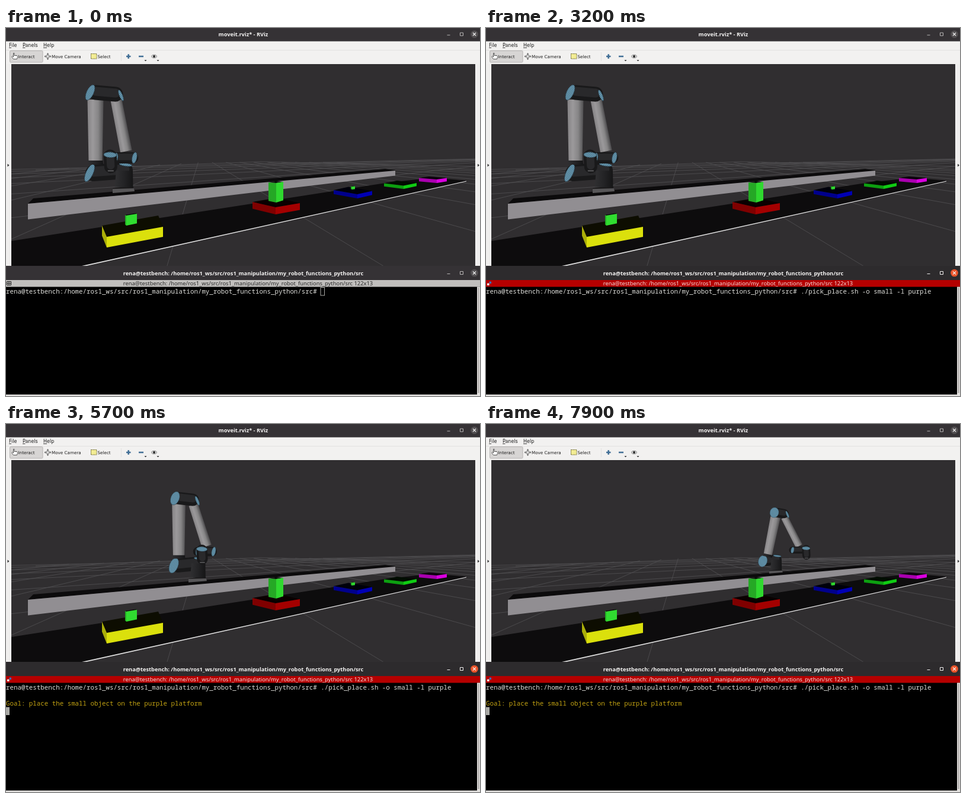
An HTML page with a canvas for the animation above (8 s loop, 800x622 px).

```html
<!DOCTYPE html>
<html lang="en">
<head>
<meta charset="utf-8">
<title>Pick and place</title>
<style>
html, body { margin: 0; width: 100%; height: 100%; overflow: hidden; background: #000; }
canvas, svg { position: absolute; left: 0; top: 0; display: block; }
svg { --bar: #353235; --disc: #535052; --btn: #b9b7b6; --tab: #c1bfbd; --tabText: #2a2a2a; }
.on { --bar: #2d2b2d; --disc: #e9542a; --btn: #f0efee; --tab: #b50000; --tabText: #f6dede; }
.bar { fill: var(--bar); }
.btn { fill: none; stroke: var(--btn); }
.disc { fill: var(--disc); }
.bold { font: bold 9.24px 'Noto Sans', 'Open Sans', sans-serif; fill: #f4f3f2; text-anchor: middle; }
.tab { font: 9.35px 'Noto Sans', 'Open Sans', sans-serif; fill: var(--tabText); text-anchor: middle; }
.menu { font: 8px 'DejaVu Sans', sans-serif; fill: #1c1c1c; }
.tool { font: 7.2px 'DejaVu Sans', sans-serif; fill: #1c1c1c; }
.term { font: 10.8px 'Noto Sans Mono', 'DejaVu Sans Mono', monospace; fill: #dededa; white-space: pre; }
.goal { fill: #c2a212; }
.u { text-decoration: underline; }
.focus, .on .idle { visibility: hidden; }
.on .focus { visibility: visible; }
</style>
</head>
<body>
<canvas id="scene" width="800" height="622"></canvas>
<svg width="800" height="622" viewBox="0 0 800 622">
  <defs>
    <g id="winButtons">
      <path class="btn" d="M744.500 1.500h5M766.500 -2.500h5v5h-5z"/>
      <circle class="disc" cx="790.500" cy="0" r="6.300"/>
      <path d="M788 -2.500l5 5m0 -5l-5 5" stroke="#f2f2f2" stroke-width="1.100"/>
    </g>
  </defs>

  <rect class="bar" width="800" height="23"/>
  <text class="bold" x="400.500" y="14">moveit.rviz* - RViz</text>
  <use href="#winButtons" y="10.500"/>

  <rect y="22.500" width="800" height="38.500" fill="#f2f1f0"/>
  <path d="M0 37.500H800" stroke="#e2e1e0"/>
  <g class="menu">
    <text x="5" y="32"><tspan class="u">F</tspan>ile</text>
    <text x="28" y="32"><tspan class="u">P</tspan>anels</text>
    <text x="63" y="32"><tspan class="u">H</tspan>elp</text>
  </g>
  <rect x="6.500" y="38.500" width="55.500" height="19.500" rx="1.500" fill="#d7d5d4" stroke="#b5b3b2"/>
  <path d="M12.500 52.500l-3-4 1-1 2 1.500v-6.500h1.500v4h4.500l1 2-1 4z" fill="#fff" stroke="#333" stroke-width=".8"/>
  <path d="M65.500 48h10M70.500 43v10M69 44.500l1.500-2 1.500 2M69 51.500l1.500 2 1.500-2M67 46.500l-2 1.500 2 1.500M74 46.500l2 1.500-2 1.500" fill="none" stroke="#555" stroke-width=".9"/>
  <circle cx="70.500" cy="48" r="2.600" fill="#ddd" stroke="#555" stroke-width=".8"/>
  <rect x="143.500" y="43.500" width="9.500" height="8.500" fill="#f2ec94" stroke="#59551f" stroke-dasharray="1.500 1"/>
  <g class="tool">
    <text x="20.500" y="51">Interact</text>
    <text x="77" y="51">Move Camera</text>
    <text x="154.500" y="51">Select</text>
  </g>
  <path d="M194.500 41v15" stroke="#e3e2e1"/>
  <path d="M203 48h7.500M206.700 44.200v7.600M224 48h8" stroke="#426f96" stroke-width="2.600"/>
  <ellipse cx="250" cy="48" rx="4.300" ry="2.700" fill="#ddd" stroke="#777" stroke-width=".8"/>
  <circle cx="250" cy="48" r="1.900" fill="#222"/>
  <path d="M233.500 54h4l-2 2.200zM254.500 54h4l-2 2.200z" fill="#333"/>

  <path d="M0 61h9v341H0zM792 61h8v341h-8z" fill="#f0efee"/>
  <path d="M2.500 229.500l3 2.500-3 2.500zM796 229.500l3 2.500-3 2.500z" fill="#333"/>

  <g id="terminal">
    <rect class="bar" y="402" width="800" height="24.500"/>
    <text class="bold" x="400.500" y="418">rena@testbench: /home/ros1_ws/src/ros1_manipulation/my_robot_functions_python/src</text>
    <use href="#winButtons" y="414"/>
    <rect y="437" width="800" height="185" fill="#000"/>
    <rect y="426" width="800" height="11.500" fill="var(--tab)"/>
    <text class="tab" x="408.500" y="435">rena@testbench: /home/ros1_ws/src/ros1_manipulation/my_robot_functions_python/src 122x13</text>
    <path class="idle" d="M1.500 428.500h7v6h-7zM5 428.500v6M1.500 431.500h7" fill="none" stroke="#222"/>
    <g class="focus">
      <rect x="2" y="431.500" width="3.500" height="3.500" fill="#f4f4f4"/>
      <rect x="5.500" y="428.500" width="3.500" height="3.500" fill="#3a6fb5"/>
    </g>
    <path d="M795 437.500h5v184.500H0v-2.500h795z" fill="#e4e2e0"/>
    <path d="M797.500 439v178" stroke="#b3b0ae" stroke-width="2.500"/>
    <text class="term" x="0" y="449">rena@testbench:/home/ros1_ws/src/ros1_manipulation/my_robot_functions_python/src# <tspan id="typed"></tspan></text>
    <text class="term goal" id="goal" x="0" y="476">Goal: place the small object on the purple platform</text>
    <rect id="cursor" width="6.500" height="13.500"/>
  </g>
</svg>
<script>
const LOOP = 8000, STEP = 100;
const COMMAND = './pick_place.sh -o small -l purple';
const FOCUS = 200, TYPE_FROM = 300, KEY_MS = 82, GOAL_AT = 3600;
const RAIL_FROM = 5100, RAIL_TO = 6750, BEND_FROM = 7000, BEND_TO = 7900;
const TUBE = ['#4f4e50', '#878687', '#9b999b', '#858385'];
const DARK = ['#161617', '#232325', '#2e2e30'];

const ctx = document.getElementById('scene').getContext('2d');
const el = id => document.getElementById(id);
const clamp = v => Math.max(0, Math.min(1, v));
const mix = (a, b, k) => a + (b - a) * k;
const add = (p, x, y) => [p[0] + x, p[1] + y];
const rad = deg => deg * Math.PI / 180;

function poly(color, ...pts) {
  ctx.beginPath();
  for (const p of pts) ctx.lineTo(...p);
  ctx.closePath();
  ctx.fillStyle = color;
  ctx.fill();
}

function line(x0, y0, x1, y1) {
  ctx.beginPath();
  ctx.moveTo(x0, y0);
  ctx.lineTo(x1, y1);
  ctx.stroke();
}

// Box seen corner-on: the front top corner, offsets to its neighbours, height.
function slab(front, toLeft, toRight, h, rgb) {
  const shade = k => `rgb(${rgb.map(c => c * k)})`;
  const left = add(front, ...toLeft), right = add(front, ...toRight);
  poly(shade(.06), left, front, right, add(right, ...toLeft));
  poly(shade(.78), left, front, add(front, 0, h), add(left, 0, h * .95));
  poly(shade(1), front, right, add(right, 0, h * .95), add(front, 0, h));
}

// Ground lines run to two vanishing points on the horizon.
function drawGrid() {
  ctx.strokeStyle = '#525153';
  ctx.lineWidth = .8;
  for (let k = -10.05; k < 20; k += 1.95) {
    const near = 227 + Math.max(0, -k);
    line(328 + k * (near - 215), near, 328 + k * 187, 402);
  }
  for (let k = 9; k < 44; k += 5.8) line(9, 218 + 924 / k, 792, 218 + 141 / k);
  line(50, 240, 430, 226);
  line(430, 226, 792, 234);
}

function drawWorld() {
  ctx.fillStyle = '#302e30';
  ctx.fillRect(9, 61, 783, 341);
  drawGrid();
  poly('#0d0c0d', [9, 360], [640, 262], [720, 253], [778, 258], [130, 403], [9, 403]);
  poly('#e6e6e6', [128, 402], [777, 258.5], [777, 259.5], [136, 402]);
  poly('#0c0b0c', [37, 297], [46, 288], [640, 238], [657, 240], [657, 242]);
  poly('#918e92', [37, 297], [657, 241], [657, 249.5], [37, 323.5]);

  slab([170, 353], [-8, -19], [95, -17], 18, [219, 224, 12]);
  slab([203, 317], [-2, -1], [18, -3], 17, [48, 220, 48]);
  slab([455, 303], [-39, -9], [41, -7], 12, [163, 0, 0]);
  slab([456, 262], [-13, -1], [12, -2], 33, [47, 216, 47]);
  slab([593, 281], [-40, -7], [25, -5.5], 7, [0, 0, 180]);
  slab([584, 268], [-2, -.5], [5, -.5], 5, [48, 216, 48]);
  slab([671, 266.5], [-33, -4], [22, -4.5], 5.5, [16, 204, 20]);
  slab([727, 256], [-30, -2.5], [17, -2.5], 6, [218, 0, 224]);
}

// Blue hatch for the joint covers.
const hatch = (() => {
  const tile = document.createElement('canvas');
  tile.width = tile.height = 3;
  const c = tile.getContext('2d');
  c.fillStyle = '#6d9db5';
  c.fillRect(0, 0, 3, 3);
  c.fillStyle = '#3d6478';
  for (let i = 0; i < 3; i++) c.fillRect(i, i, 1, 1);
  return ctx.createPattern(tile, 'repeat');
})();

// Tapered tube shaded across its width.
function tube(p, q, w0, w1, shades) {
  const len = Math.hypot(q[0] - p[0], q[1] - p[1]);
  const nx = (p[1] - q[1]) / len / 2, ny = (q[0] - p[0]) / len / 2;
  const g = ctx.createLinearGradient(...add(p, -nx * w0, -ny * w0), ...add(p, nx * w0, ny * w0));
  shades.forEach((c, i) => g.addColorStop(i / (shades.length - 1), c));
  poly(g, add(p, -nx * w0, -ny * w0), add(q, -nx * w1, -ny * w1),
    add(q, nx * w1, ny * w1), add(p, nx * w0, ny * w0));
}

function joint(p, q, w) {
  ctx.lineCap = 'round';
  ctx.strokeStyle = '#19191a';
  ctx.lineWidth = w;
  line(...p, ...q);
  ctx.strokeStyle = '#29292b';
  ctx.lineWidth = w * .6;
  line(p[0], p[1] - w * .08, q[0], q[1] - w * .08);
  ctx.lineCap = 'butt';
}

function cap(p, rx, ry, tilt) {
  ctx.beginPath();
  ctx.ellipse(...p, rx, ry, rad(tilt), 0, 2 * Math.PI);
  ctx.fillStyle = hatch;
  ctx.fill();
  ctx.strokeStyle = '#263c48';
  ctx.lineWidth = .7;
  ctx.stroke();
}

// Even travel along the rail, seen in perspective. As the arm moves away,
// its sideways parts turn toward the viewer by the same factor s.
function drawRobot(u, bend) {
  const far = 1.615, s = 1 / mix(1, far, u);
  const lean = rad(11.5 * bend), reach = rad(11 + 42 * (1 - s));
  const shoulder = [-57 * s, -28];
  const onArm = (x, y) => add(shoulder,
    x * Math.cos(lean) + y * Math.sin(lean), x * Math.sin(lean) - y * Math.cos(lean));
  const foot = onArm(10, 18), head = onArm(10, 124), elbow = onArm(10 - 9 * s, 136);
  const elbowEnd = add(elbow, 43 * s, 3), foreHead = add(elbowEnd, 1, 10);
  const wrist = add(foreHead, 88 * Math.sin(reach), 88 * Math.cos(reach));
  const left = add(wrist, -18, 11), right = add(wrist, 11, 11);
  const top = add(wrist, 78 - 105 * s + 6 * bend, 8), tip = add(top, 1, 18);
  const column = [2, -32], coverW = 6 + 16 * (1 - s), coverTilt = 25 * s;

  ctx.save();
  ctx.translate(mix(198, 489 * far, u) * s, mix(273, 249 * far, u) * s);
  ctx.scale(s, s);
  poly('#1b1a1b', [-18, -2], [15, -7], [19, 1], [-17, 4]);
  poly('#575658', [-18, -1], [18, -2], [19, 3], [-18, 6]);
  joint(add(shoulder, 7, 0), column, 28);
  tube(column, [1, -4], 28, 31, DARK);
  cap(add(column, 2, -10), 11, 2.6, 8);
  cap(shoulder, coverW, 16, coverTilt);

  tube(head, foot, 27, 23, TUBE);
  tube(onArm(10, 21), onArm(10, 14), 25, 26, DARK);
  tube(foreHead, wrist, 19, 20, TUBE);

  joint(add(elbow, 9, 0), elbowEnd, 25);
  cap(add(elbowEnd, 9, 2), 2.8, 10, -22);
  cap(elbow, coverW, 14, coverTilt);

  joint(left, right, 19);
  cap(left, 4, 8.5, 10);
  cap(add(right, 3, 0), 4, 9.5, 12);
  joint(top, tip, 22);
  cap(add(top, 0, -2), 11, 4.6, 3);
  ctx.fillStyle = '#59595b';
  ctx.fillRect(tip[0] - 5, tip[1] + 6, 10, 2);
  ctx.restore();
}

// Speeds up over the first quarter, slows down over the last.
function travel(t) {
  if (t < .25) return t * t / .375;
  if (t > .75) return 1 - (1 - t) ** 2 / .375;
  return (t - .125) / .75;
}

function setCursor(x, y, hollow) {
  const c = el('cursor');
  c.setAttribute('x', x);
  c.setAttribute('y', y);
  c.setAttribute('fill', hollow ? 'none' : '#a9a9a5');
  c.setAttribute('stroke', hollow ? '#a9a9a5' : 'none');
}

function drawTerminal(t) {
  const count = Math.max(0, Math.floor((t - TYPE_FROM) / KEY_MS));
  const done = t >= GOAL_AT;
  el('terminal').classList.toggle('on', t >= FOCUS);
  el('typed').textContent = COMMAND.slice(0, count);
  el('goal').style.visibility = done ? 'visible' : 'hidden';
  el('cursor').style.visibility = done || count === 0 ? 'visible' : 'hidden';
  if (done) setCursor(-.5, 478.5, false);
  else setCursor(531, 438.5, t < FOCUS);
}

let shown = -1;
function tick() {
  const t = Math.floor(performance.now() % LOOP / STEP) * STEP;
  if (t !== shown) {
    shown = t;
    drawWorld();
    drawRobot(travel(clamp((t - RAIL_FROM) / (RAIL_TO - RAIL_FROM))),
      clamp((t - BEND_FROM) / (BEND_TO - BEND_FROM)) ** 1.4);
    drawTerminal(t);
  }
  requestAnimationFrame(tick);
}
tick();
</script>
</body>
</html>
```
